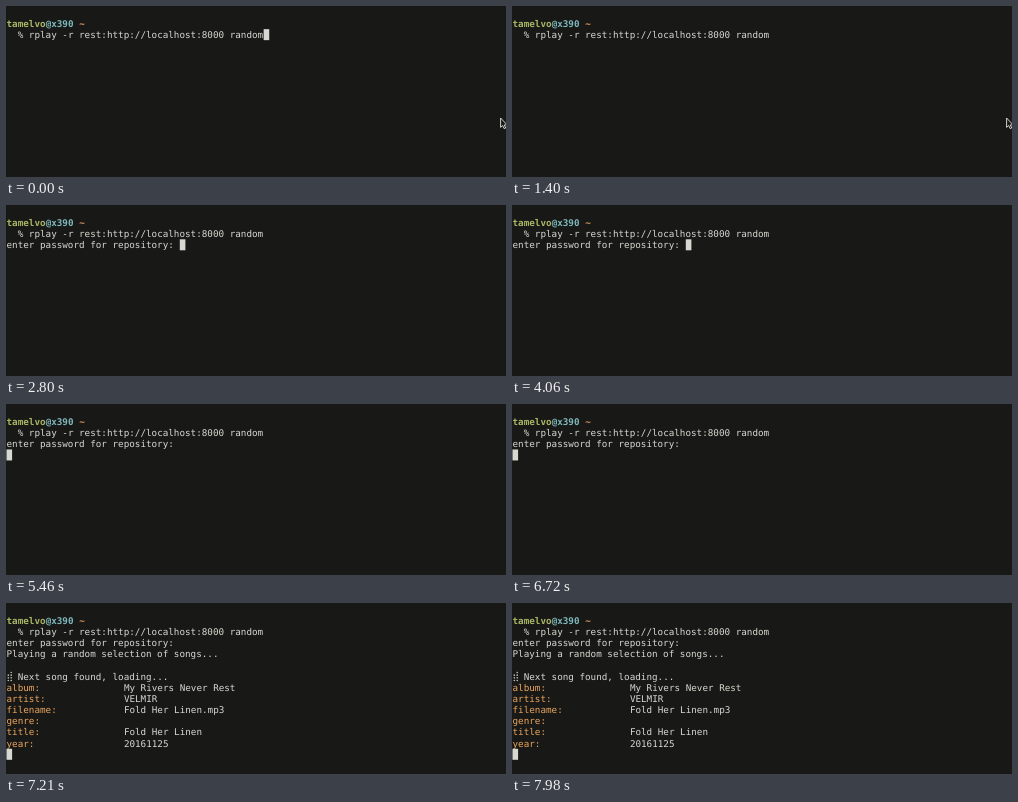
These frames come from a looping animation (500 px wide and 171 px high, 8 s). An HTML page:

```html
<!DOCTYPE html>
<html lang="en">
<head>
<meta charset="utf-8">
<title>Terminal</title>
<style>
  html, body { margin: 0; width: 100%; height: 100%; overflow: hidden; background: #181816; }
  svg { display: block; width: 500px; height: 171px; }
  text {
    font: 9.286px "DejaVu Sans Mono", monospace;
    fill: #d8d8d1;
    white-space: pre;
    text-rendering: geometricPrecision;
  }
  .user { fill: #a9b665; font-weight: bold; }
  .host { fill: #7fb9bd; font-weight: bold; }
  .path { fill: #dd9a63; font-weight: bold; }
  .label { fill: #e8a55e; }
</style>
</head>
<body>
<svg viewBox="0 0 500 171">
  <rect width="500" height="171" fill="#181816"/>
  <g id="screen"></g>
  <rect id="cursor" width="5.6" height="11" fill="#d8d8d2"/>
  <path id="pointer" d="M494.6 112v9.4l2.1-1.9 1.5 3.2 1.5-.7-1.4-3.1h2.8z"
        fill="#181816" stroke="#e4e4e0" stroke-width=".9"/>
</svg>
<script>
const CELL = 5.59, ROW = 11.15, LEFT = .5, TOP = 12;
const LOOP = 8000, BLINK = 630;
const ASK = 2800, TYPE = 4060, ENTER = 5390, READY = 5460, LOAD = 7140, TAGS = 7210;

const $ = id => document.getElementById(id);
const cellX = col => LEFT + col * CELL;
const cellY = row => TOP + row * ROW;

function add(parent, tag, attrs) {
  const el = document.createElementNS('http://www.w3.org/2000/svg', tag);
  for (const key in attrs) el.setAttribute(key, attrs[key]);
  return parent.appendChild(el);
}

function print(parent, row, col, text, style = '') {
  add(parent, 'text', { x: cellX(col), y: cellY(row) + 8.9, class: style }).textContent = text;
}

// Each stage adds output and moves the cursor
const stages = [];
function stage(at, row, col) {
  const group = add($('screen'), 'g', {});
  stages.push({ at, row, col, group });
  return group;
}

const prompt = stage(0, 1, 46);
print(prompt, 0, 0, 'tamelvo', 'user');
print(prompt, 0, 7, '@x390', 'host');
print(prompt, 0, 13, '~', 'path');
print(prompt, 1, 2, '% rplay -r rest:http://localhost:8000 random');

print(stage(ASK, 2, 31), 2, 0, 'enter password for repository:');
stage(ENTER, 3, 0);

const loading = stage(LOAD, 5, 30);
print(loading, 3, 0, 'Playing a random selection of songs...');
print(loading, 5, 2, 'Next song found, loading...');

// Braille spinner: two columns of four dots, upper left one missing
for (let i = 1; i < 8; i++) {
  add(loading, 'circle', {
    cx: LEFT + 1.8 + (i % 2) * 2.9, cy: cellY(5) + 1.7 + (i >> 1) * 2.7, r: .8, fill: '#c4c4bd'
  });
}

const song = {
  album: 'My Rivers Never Rest',
  artist: 'VELMIR',
  filename: 'Fold Her Linen.mp3',
  genre: '',
  title: 'Fold Her Linen',
  year: '20161125'
};
const tags = stage(TAGS, 12, 0);
Object.entries(song).forEach(([label, value], i) => {
  print(tags, 6 + i, 0, label + ':', 'label');
  print(tags, 6 + i, 21, value);
});

const show = (el, on) => { el.style.display = on ? '' : 'none'; };

// The blink restarts with each prompt; typing keeps the cursor lit
function cursorLit(t) {
  if (t >= TYPE && t < READY) return true;
  const since = t < ASK ? 140 - BLINK : t < TYPE ? ASK : READY;
  return Math.floor((t - since) / BLINK) % 2 === 0;
}

function draw(t) {
  for (const s of stages) show(s.group, t >= s.at);
  show($('pointer'), t < ASK);
  show($('cursor'), cursorLit(t));
  const { row, col } = stages.findLast(s => t >= s.at);
  $('cursor').setAttribute('x', cellX(col));
  $('cursor').setAttribute('y', cellY(row));
}

const start = performance.now();
function frame() {
  draw((performance.now() - start) % LOOP);
  requestAnimationFrame(frame);
}
frame();
</script>
</body>
</html>
```
